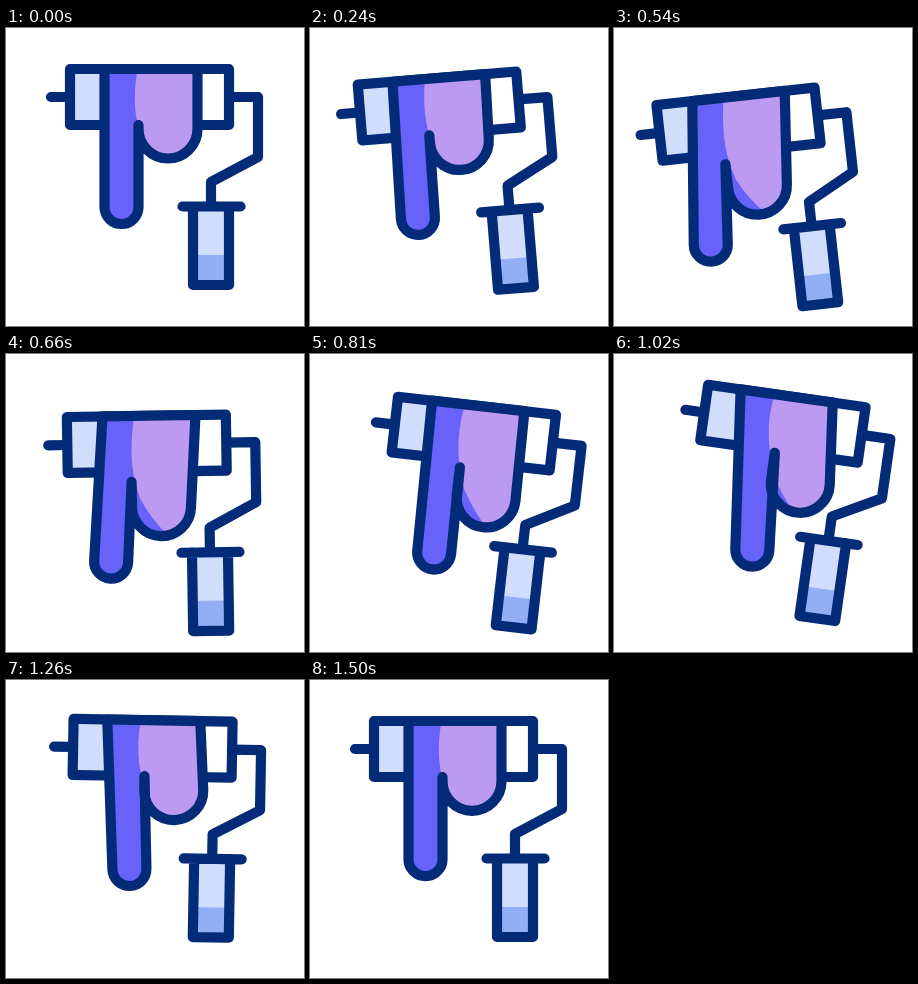
An HTML page that plays this animation: 298 by 298 pixels, repeating every 1.56 s.

```html
<!DOCTYPE html>
<html lang="en">
<head>
<meta charset="utf-8">
<title>Paint roller</title>
<style>
  html, body { margin: 0; width: 100%; height: 100%; overflow: hidden; background: #fff; }
  svg { display: block; width: 100vw; height: 100vh; }
  .line { fill: none; stroke: #032b78; stroke-width: 10.2; stroke-linecap: round; stroke-linejoin: round; }
</style>
</head>
<body>
<svg viewBox="0 0 298 298">
  <defs><clipPath id="clip"><path id="mask"/></clipPath></defs>
  <g id="tool">
    <path class="line" d="M45 69H64M223 69H252V129L205 154V178"/>
    <path fill="#fff" d="M64 41H223V97H64Z"/>
    <path fill="#d1ddfd" d="M64 41H118V97H64Z"/>
    <path class="line" d="M64 41H223V97H64Z"/>
    <path fill="#d1ddfd" d="M187 178H223V257H187Z"/>
    <path fill="#92aff5" d="M187 227H223V257H187Z"/>
    <path class="line" d="M176.500 178.500H234.500M187 178.500V257H223V178.500"/>
    <g clip-path="url(#clip)">
      <path fill="#6762f9" d="M0 0H298V298H0Z"/>
      <path id="light" fill="#bc9af2"/>
    </g>
    <path id="edge" class="line"/>
  </g>
</svg>
<script>
  const LOOP = 1560, STEP = 30, TOP = 41;
  const $ = id => document.getElementById(id);
  const tool = $('tool'), mask = $('mask'), edge = $('edge'), light = $('light');

  // Sine ease from 0 to 1 between two times.
  function ease(t, from, to) {
    const p = Math.min(1, Math.max(0, (t - from) / (to - from)));
    return (1 - Math.cos(Math.PI * p)) / 2;
  }

  // Tilt of the tool: left, right, back to rest.
  const tiltAt = t => -8.1 * ease(t, 0, 435) + 17.1 * ease(t, 435, 935) - 9 * ease(t, 935, 1350);

  const pt = (x, y) => x.toFixed(2) + ' ' + y.toFixed(2);

  // Half circle hanging below a centre, turned by an angle.
  function bowl(x, y, r, turn) {
    const dx = r * Math.cos(turn), dy = r * Math.sin(turn);
    return `L${pt(x - dx, y - dy)}A${r} ${r} 0 0 0 ${pt(x + dx, y + dy)}`;
  }

  function draw(time) {
    const t = time < 60 ? 0 : Math.floor(time / STEP) * STEP;
    const sink = 20 * (ease(t, 110, 600) - ease(t, 615, 1320));

    // The wet paint swings behind the tool and stretches.
    const swing = tiltAt(t - 110);
    const lean = -0.7 * swing, turn = lean * Math.PI / 180;
    const shift = -0.19 * swing;
    const drop = 7 * ease(t, 220, 480) + 12 * ease(t, 620, 1000) - 19 * ease(t, 1050, 1530);
    const drip = 138 + drop;
    const lobe = 60 + 31 * (ease(t, 160, 500) - ease(t, 800, 1550));
    const notch = 97 + 10.5 * (ease(t, 200, 500) - ease(t, 560, 1200));

    const outline = `M${98.5 + shift} ${TOP}`
      + bowl(115.5 + shift - Math.tan(turn) * drip, TOP + drip, 17, turn)
      + `L${pt(132.5 + 0.8 * swing, notch)}`
      + bowl(162 + 0.8 * swing, TOP + lobe, 29.5, -Math.atan(0.8 * swing / lobe))
      + `L${191.5 + shift} ${TOP}Z`;
    mask.setAttribute('d', outline);
    edge.setAttribute('d', outline);

    // Border between the two paint tones.
    const b = -0.35 * swing;
    light.setAttribute('d', `M131.5 ${TOP}C${pt(127 + b, 66)} ${pt(127 + b, 94)} ${pt(140 + b, 120 + drop / 2)}`
      + `Q${pt(150 + b, 138 + drop / 2)} ${pt(170 + b, 154 + drop)}H260V${TOP}Z`);
    light.setAttribute('transform', `translate(0 ${TOP}) skewX(${-lean}) translate(0 ${-TOP})`);

    tool.setAttribute('transform', `translate(0 ${sink}) rotate(${tiltAt(t)} 205.5 245)`);
  }

  const start = performance.now();
  function tick() {
    draw((performance.now() - start) % LOOP);
    requestAnimationFrame(tick);
  }
  tick();
</script>
</body>
</html>
```
